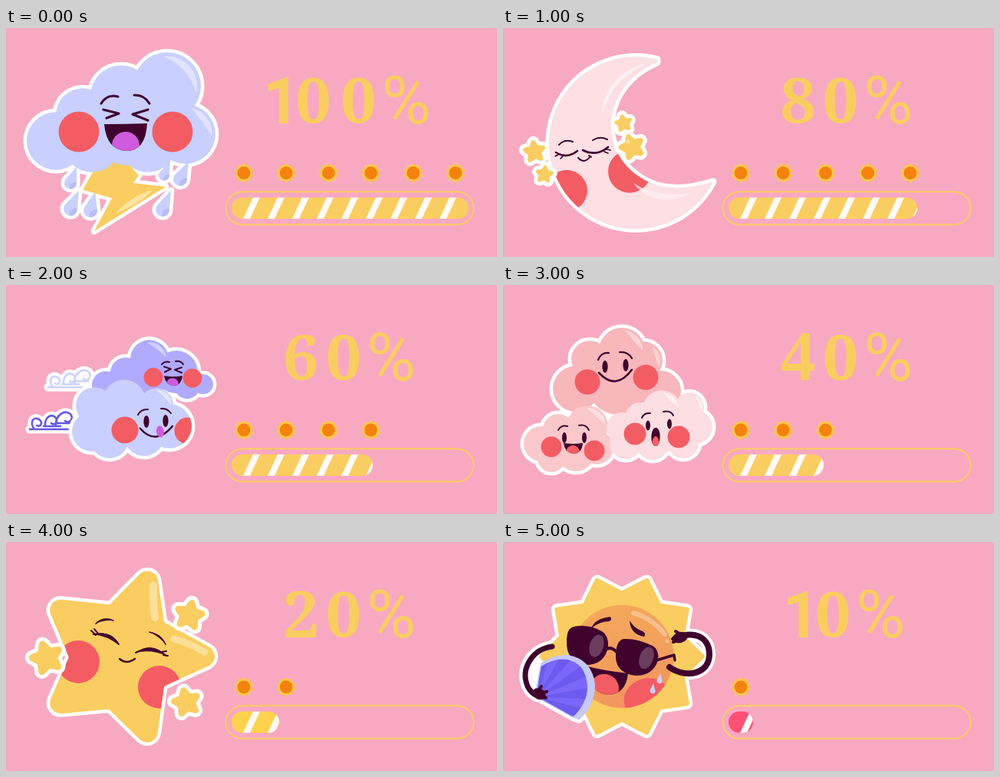
Animation, 640 px wide and 300 px high, one loop 6 s. Source, as an HTML page with a canvas:

```html
<!DOCTYPE html>
<html lang="en">
<head>
<meta charset="utf-8">
<title>Weather battery</title>
<style>
html, body { margin: 0; width: 100%; height: 100%; overflow: hidden; background: #f8a9c2; }
canvas { display: block; width: 640px; height: 300px; }
</style>
</head>
<body>
<canvas id="stage"></canvas>
<script>
const canvas = document.getElementById('stage');
const ctx = canvas.getContext('2d');
const dpr = window.devicePixelRatio || 1;
canvas.width = 640 * dpr;
canvas.height = 300 * dpr;

const PINK = '#f8a9c2', YELLOW = '#facd60', DARK = '#40032e', RED = '#f45c63';
const LILAC = '#c9cfff', VIOLET = '#b0abff', TONGUE = '#ce5bde', ORANGE = '#f5820d';
const TAU = Math.PI * 2;

// ---------- drawing helpers ----------
const shape = d => new Path2D(d);

function fill(path, color) {
  ctx.fillStyle = color;
  ctx.fill(path);
}

function line(d, width, color = DARK) {
  ctx.strokeStyle = color;
  ctx.lineWidth = width;
  ctx.lineCap = ctx.lineJoin = 'round';
  ctx.stroke(typeof d === 'string' ? shape(d) : d);
}

const halo = (paths, width = 9) => paths.forEach(p => line(p, width, '#fff'));

function oval(x, y, rx, ry, color, turn = 0) {
  ctx.beginPath();
  ctx.ellipse(x, y, rx, ry, turn, 0, TAU);
  ctx.fillStyle = color;
  ctx.fill();
}

const disc = (x, y, r, color) => oval(x, y, r, r, color);

function clipped(path, draw) {
  ctx.save();
  ctx.clip(path);
  draw();
  ctx.restore();
}

function blob(circles) {
  const p = new Path2D();
  for (const [x, y, r] of circles) {
    p.moveTo(x + r, y);
    p.arc(x, y, r, 0, TAU);
  }
  return p;
}

// Even corners get the tip radius, odd ones the notch radius.
function roundPoly(pts, tip, notch = tip) {
  const p = new Path2D(), n = pts.length, last = pts[n - 1];
  p.moveTo((last[0] + pts[0][0]) / 2, (last[1] + pts[0][1]) / 2);
  pts.forEach((q, i) => p.arcTo(...q, ...pts[(i + 1) % n], i % 2 ? notch : tip));
  p.closePath();
  return p;
}

function star(x, y, r, turn, inner = 0.5, points = 5, tip = r * 0.16) {
  const pts = [];
  for (let i = 0; i < points * 2; i++) {
    const a = turn + i * Math.PI / points, d = i % 2 ? r * inner : r;
    pts.push([x + d * Math.cos(a), y + d * Math.sin(a)]);
  }
  return roundPoly(pts, tip, 2);
}

function drop(x, y, r, tx, ty) {
  const a = Math.atan2(ty - y, tx - x), p = new Path2D();
  p.moveTo(tx, ty);
  p.arc(x, y, r, a + 1.15, a - 1.15);
  p.closePath();
  return p;
}

// Crescent highlight hugging the inside of a circle.
function gloss(x, y, r, a0, a1, depth, color) {
  const at = (a, d) => [x + d * Math.cos(a), y + d * Math.sin(a)];
  const p = at(a0, r), q = at(a1, r), m = at((a0 + a1) / 2, r - depth);
  ctx.beginPath();
  ctx.arc(x, y, r, a0, a1);
  ctx.quadraticCurveTo(2 * m[0] - (p[0] + q[0]) / 2, 2 * m[1] - (p[1] + q[1]) / 2, ...p);
  ctx.fillStyle = color;
  ctx.fill();
}

function laugh(d, tx, ty, tr, color) {
  const mouth = shape(d);
  fill(mouth, DARK);
  clipped(mouth, () => disc(tx, ty, tr, color));
}

// ---------- characters ----------
function stormCloud() {
  const cloud = blob([[65, 148, 38], [100, 114, 35], [150, 89, 40], [210, 76, 44],
    [234, 139, 39], [112, 152, 37], [185, 152, 37], [160, 130, 50]]);
  const bolt = shape('M118 180L148 165L173 193L166 203L208 208L115 266L138 223L100 212Z');
  const drops = [[84, 203, 8, 92, 182], [84, 237, 9, 95, 213], [110, 239, 9, 116, 215],
    [206, 193, 7, 214, 174], [227, 198, 9, 238, 175], [204, 238, 9, 215, 213]];
  const paths = drops.map(d => drop(...d));
  halo([bolt, ...paths, cloud]);
  paths.forEach((p, i) => {
    const [x, y, r] = drops[i];
    fill(p, LILAC);
    clipped(p, () => disc(x + r * 0.7, y + r * 0.7, r * 0.8, '#b7bcf5'));
  });
  fill(bolt, YELLOW);
  fill(shape('M143 243Q160 222 190 212Q185 224 143 243Z'), '#fde3a0');
  fill(cloud, LILAC);
  gloss(210, 76, 39, -1.7, 0.25, 9, '#e0e4ff');
  gloss(234, 139, 35, -1.35, 0.1, 8, '#e0e4ff');

  disc(95, 136, 26.5, RED);
  disc(217, 136, 26.5, RED);
  line('M124 99Q132 86 146 90M167 88Q180 87 187 99', 3);
  line('M127 107L147 112L131 118M185 107L165 113L185 121', 3.2);
  laugh('M128 126Q156 126 184 125Q182 161 157 161Q131 160 128 126Z', 156, 154, 18, TONGUE);
}

function moon() {
  const body = shape('M201 41A113 113 0 1 0 274 201C240 212 205 214 178 195C122 158 130 75 201 45Z');
  const stars = [star(41, 162, 19, -1.7), star(54, 192, 15, -1.45),
    star(157, 125, 15, -1.75), star(168, 156, 22, -1.9)];
  halo([body, ...stars]);
  fill(body, '#fddfe4');
  clipped(body, () => {
    fill(shape('M185 47C152 54 128 84 129 113C136 104 133 75 185 47Z'), '#fef0f3');
    disc(83, 213, 27, RED);
    disc(165, 188, 28, RED);
    fill(shape('M170 203C185 226 220 232 245 216C215 220 190 216 170 203Z'), 'rgba(255,242,245,.7)');
  });
  halo(stars, 10);
  stars.forEach(s => fill(s, YELLOW));
  disc(163, 149, 2.5, '#fde3a0');
  line('M73 153Q80 145 91 149M117 147Q126 141 136 146', 2);
  line('M69 163Q83 172 97 161M104 160Q122 169 137 156', 2.6);
  line('M72 166L68 168M78 168L75 171M132 162L137 164M135 159L140 160', 1.6);
  line('M98 170Q106 179 114 168M112 167L115 169', 2);
}

function gust(x, y, color) {
  const p = shape('M0 15H58M6 15C-1 5 5 -2 12 2C18 6 14 13 9 10' +
    'M20 11C19 0 27 -6 33 -1C38 5 32 11 28 7M34 9C34 -4 45 -11 53 -5C58 2 51 8 46 4M18 11H40M34 7H57');
  ctx.save();
  ctx.translate(x, y);
  line(p, 11, '#fff');
  line(p, 2.6, color);
  ctx.restore();
}

function windyClouds() {
  const back = blob([[130, 131, 18], [156, 115, 20], [187, 97, 25], [222, 114, 28],
    [257, 130, 13], [236, 132, 17], [180, 125, 28]]);
  const front = blob([[154, 152, 28], [115, 158, 24], [196, 157, 22], [213, 185, 29],
    [112, 192, 26], [135, 202, 25], [180, 198, 26], [155, 182, 30]]);
  gust(55, 119, '#cdd2ff');
  gust(31, 174, '#6657e8');
  halo([back, front]);
  fill(back, VIOLET);
  gloss(187, 97, 22, -1.7, -0.1, 6, '#d0cdff');
  disc(192, 121, 12.5, RED);
  disc(243, 122, 12.5, RED);
  line('M203 104Q207 99 213 101M221 100Q228 99 231 104', 2);
  line('M206 107L215 110L207 114M229 108L220 111L229 115', 2);
  laugh('M206 119Q218 121 230 119Q228 133 217 132Q208 130 206 119Z', 217, 130, 8, TONGUE);

  fill(front, LILAC);
  gloss(196, 157, 20, -1.6, 0, 6, '#e0e4ff');
  clipped(front, () => {
    disc(155, 190, 17.5, RED);
    disc(237, 191, 17.5, RED);
  });
  line('M172 170Q176 162 185 163M202 162Q210 161 215 168', 2);
  oval(183, 179, 3.6, 8, DARK);
  oval(208, 178, 3.6, 8, DARK);
  line('M175 188Q195 211 217 185', 2.6);
  oval(201, 192, 5, 7.5, TONGUE, -0.15);
}

function pinkClouds() {
  const back = blob([[155, 86, 30], [113, 97, 24], [183, 99, 25], [95, 136, 30],
    [205, 139, 27], [150, 130, 40]]);
  const left = blob([[110, 185, 27], [72, 189, 20], [50, 208, 23], [63, 227, 18],
    [95, 220, 24], [122, 213, 22], [80, 205, 22]]);
  const right = blob([[155, 187, 20], [178, 172, 18], [207, 163, 25], [243, 160, 19],
    [251, 186, 22], [235, 207, 20], [195, 208, 21], [160, 207, 21], [205, 190, 30]]);
  halo([back, left, right]);

  fill(back, '#f8b7bb');
  gloss(155, 86, 27, -1.4, 0, 7, '#fcd3d5');
  gloss(183, 99, 22, -1, 0.4, 6, '#fcd3d5');
  disc(110, 127, 16.5, RED);
  disc(186, 121, 16.5, RED);
  line('M124 98Q128 88 138 89M152 88Q163 87 168 96', 2.2);
  oval(133, 107, 3.6, 8, DARK);
  oval(160, 105, 3.6, 8, DARK);
  line('M125 115Q147 139 168 111', 2.6);

  fill(left, '#fac8ca');
  gloss(110, 185, 24, -1.6, -0.1, 7, '#fddfe1');
  disc(63, 212, 13.5, RED);
  disc(119, 217, 13.5, RED);
  line('M72 190Q76 183 84 185M99 184Q108 182 112 190', 2);
  oval(80, 200, 3, 7, DARK);
  oval(106, 200, 3, 7, DARK);
  laugh('M79 207Q92 209 104 207Q103 221 91 221Q80 219 79 207Z', 91, 219, 9, RED);

  fill(right, '#fcdde1');
  gloss(207, 163, 22, -1.5, -0.1, 6, '#fff0f2');
  gloss(243, 160, 17, -1.1, 0.4, 4, '#fff0f2');
  disc(172, 195, 14.5, RED);
  disc(229, 199, 14.5, RED);
  line('M181 174Q184 167 192 168M209 166Q219 164 222 171', 2);
  oval(189, 184, 3, 6.5, DARK);
  oval(217, 182, 3, 6.5, DARK);
  const mouth = shape('M199 187C207 187 206 211 199 211C191 211 192 187 199 187Z');
  fill(mouth, DARK);
  clipped(mouth, () => oval(199, 207, 4.5, 9, RED));
}

function bigStar() {
  const body = roundPoly([[194, 22], [206, 105], [289, 151], [206, 189], [194, 278],
    [134, 219], [49, 227], [82, 151], [49, 73], [135, 82]], 14, 4);
  const minis = [star(239, 96, 26, -1.37), star(53, 152, 29, -1.86), star(235, 210, 25, -1.8)];
  halo([body]);
  fill(body, YELLOW);
  clipped(body, () => {
    disc(94, 157, 28, RED);
    disc(200, 190, 28, RED);
  });
  line('M192 57Q191 77 194 99', 10, '#fce09a');
  line('M219 127Q238 132 259 144', 9, '#fce09a');
  halo(minis, 10);
  minis.forEach(s => fill(s, YELLOW));
  fill(shape('M117 107Q127 96 140 103Q128 102 117 107ZM187 118Q202 119 208 134Q200 124 187 118Z'), DARK);
  line('M117 107Q127 97 140 103M187 118Q202 121 208 134', 1.6);
  fill(shape('M114 121Q139 115 147 135Q132 123 114 121ZM169 145Q190 129 209 149Q189 140 169 145Z'), DARK);
  line('M114 121Q136 117 147 134M169 145Q190 134 209 149', 2);
  line('M117 122L111 116M121 121L115 114M203 144L209 143M205 148L211 149', 2);
  line('M148 153Q157 161 168 153', 2.4);
}

function coolSun() {
  const rays = star(155, 150, 109, 0, 0.79, 10, 3);
  const face = blob([[155, 150, 67.5]]);
  const fan = shape('M41 202L49 159Q64 147 85 148Q117 154 120 188Q119 216 99 233L91 230Z');
  const armR = shape('M217 164C240 180 269 172 269 147C269 122 244 116 229 126');
  const armL = shape('M64 137C40 140 22 164 32 189Q37 199 46 202');
  halo([rays, fan]);
  halo([armR, armL], 16);
  fill(shape('M64 137C40 140 28 170 46 202L70 160Z'), '#fff');

  fill(rays, YELLOW);
  const glow = ctx.createLinearGradient(130, 82, 175, 218);
  glow.addColorStop(0, '#f4a95a');
  glow.addColorStop(1, '#f1965f');
  fill(face, glow);
  line('M170 93Q193 99 211 121', 6, '#f9c08d');
  disc(214, 130, 2.6, '#f9c08d');
  clipped(face, () => oval(187, 204, 30, 25, RED, -0.35));

  laugh('M106 162Q133 169 163 172Q160 200 137 200Q112 198 106 162Z', 132, 192, 19, RED);
  fill(drop(204, 182, 3.5, 205, 172), '#c3d4fa');
  fill(drop(195, 195, 3.5, 196, 185), '#c3d4fa');
  fill(shape('M115 113Q120 100 140 98Q143 102 138 104Q126 104 115 113Z'), DARK);
  fill(shape('M165 103Q166 121 184 124Q187 120 182 117Q171 113 165 103Z'), DARK);

  // sunglasses
  fill(shape('M92 111Q110 107 127 116Q138 121 137 138Q132 161 108 161Q82 157 83 130Q83 113 92 111Z'), DARK);
  fill(shape('M157 127Q175 126 195 136Q204 141 202 155Q195 176 172 175Q145 171 147 146Q148 129 157 127Z'), DARK);
  oval(122, 136, 9, 15, '#6c3c5c', 0.3);
  oval(187, 152, 9, 15, '#6c3c5c', 0.35);
  line('M135 140Q142 137 148 144', 4);
  line('M200 155L223 148L224 155', 3.4);

  line(armR, 8);
  oval(231, 125, 10, 7, DARK, -0.3);
  line('M226 122L221 127M228 129L222 131M230 120L225 117', 4);

  // fan
  fill(fan, '#c5c9f7');
  const cloth = shape('M43 202L50 163Q66 152 83 154Q107 158 110 188Q110 212 91 229Z');
  fill(cloth, '#7c67fb');
  clipped(cloth, () => {
    for (let i = 0; i < 5; i++) {
      const a = -1.5 + i * 0.44;
      ctx.beginPath();
      ctx.moveTo(45, 203);
      ctx.arc(45, 203, 90, a, a + 0.22);
      ctx.fillStyle = '#6d5af0';
      ctx.fill();
    }
  });
  line(armL, 7);
  oval(47, 199, 9, 7, DARK, 0.5);
  line('M45 197L50 189M50 198L57 196M50 203L56 204', 4);
}

// ---------- gauge ----------
const WIDTHS = { '1': 25, '0': 52, '%': 59 };
const FACES = {
  '1': ['700', 'Roboto, sans-serif'],
  '%': ['400', 'Roboto, sans-serif'],
  '4': ['700', '"Liberation Serif", serif']
};

// Sizes each glyph so its ink spans the same height.
function glyph(ch, mid) {
  const [weight, family] = FACES[ch] || ['700', '"Noto Serif", serif'];
  const high = ch === '%' ? 64 : 61, base = ch === '%' ? 126 : 125;
  ctx.textAlign = 'left';
  ctx.textBaseline = 'alphabetic';
  ctx.font = `${weight} 100px ${family}`;
  const m = ctx.measureText(ch);
  const k = high / (m.actualBoundingBoxAscent + m.actualBoundingBoxDescent);
  ctx.font = `${weight} ${100 * k}px ${family}`;
  ctx.fillStyle = YELLOW;
  ctx.fillText(ch, mid - k * (m.actualBoundingBoxRight - m.actualBoundingBoxLeft) / 2,
    base - k * m.actualBoundingBoxDescent);
}

function label(text) {
  const widths = [...text].map(ch => WIDTHS[ch] || 45);
  let x = 447 - (widths.reduce((a, b) => a + b) + 7 * (text.length - 1)) / 2;
  [...text].forEach((ch, i) => {
    glyph(ch, x + widths[i] / 2);
    x += widths[i] + 7;
  });
}

function pill(x, y, w, h, r) {
  const p = new Path2D();
  p.roundRect(x, y, w, h, r);
  return p;
}

function gauge(end, color) {
  line(pill(286.5, 214.5, 323, 43, 21.5), 2, YELLOW);
  const bar = pill(294, 222, end - 294, 28, 14);
  fill(bar, color);
  clipped(bar, () => {
    for (let i = 0; i < 9; i++) {
      const x = 309 + i * 32;
      fill(shape(`M${x} 250L${x + 13} 222H${x + 22}L${x + 9} 250Z`), '#fffaf5');
    }
  });
}

function sunIcon(x) {
  fill(star(x, 190, 13.5, -Math.PI / 2, 0.76, 10, 1.2), '#fac64f');
  disc(x, 190, 8.4, ORANGE);
}

// ---------- playback ----------
const scenes = [
  [stormCloud, '100%', 603, YELLOW],
  [moon, '80%', 540, YELLOW],
  [windyClouds, '60%', 478, YELLOW],
  [pinkClouds, '40%', 418, YELLOW],
  [bigStar, '20%', 356, '#ffd24d'],
  [coolSun, '10%', 326, '#ff5075']
];

function render(ms) {
  const index = Math.floor(ms / 1000) % scenes.length;
  const [character, text, end, color] = scenes[index];
  ctx.setTransform(dpr, 0, 0, dpr, 0, 0);
  ctx.fillStyle = PINK;
  ctx.fillRect(0, 0, 640, 300);
  character();
  label(text);
  for (let i = 0; i < scenes.length - index; i++) sunIcon(310 + i * 55.2);
  gauge(end, color);
}

const start = performance.now();
function tick() {
  render(performance.now() - start);
  requestAnimationFrame(tick);
}
tick();
</script>
</body>
</html>
```
